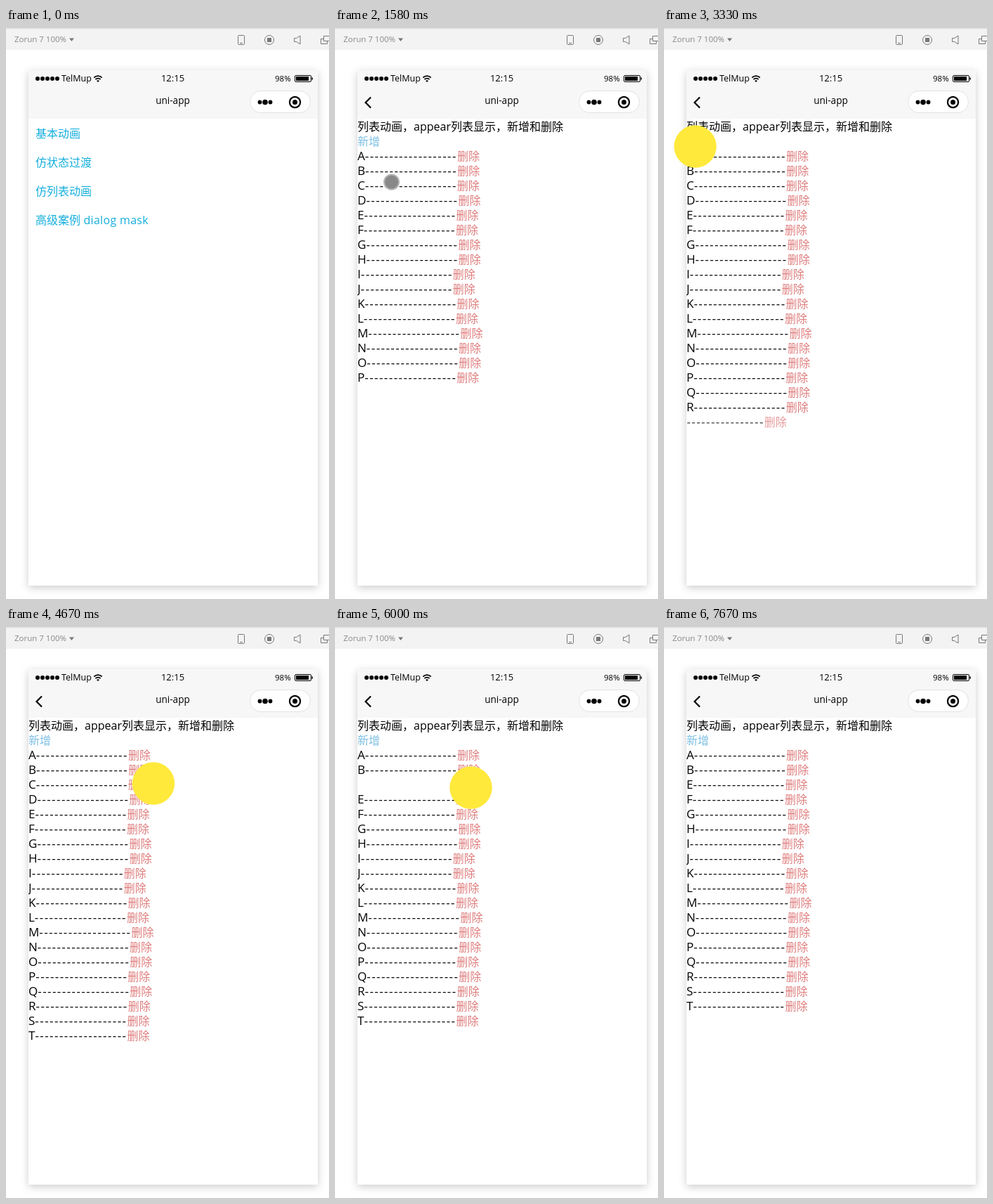
These frames come from a looping animation (460x812 px, 7.76 s). An HTML page:

```html
<!DOCTYPE html>
<html lang="zh-CN">
<head>
<meta charset="utf-8">
<title>List animation</title>
<style>
  html, body { margin: 0; width: 100%; height: 100%; overflow: hidden; background: #fff; }
  svg { display: block; font-family: "Open Sans", "Noto Sans CJK SC", "Noto Sans CJK", sans-serif; font-size: 16px; }
  .phone { filter: drop-shadow(0 3px 6px rgba(0, 0, 0, .2)); }
  .tool { fill: none; stroke: #777; }
  .link { fill: #14aedd; }
  .add { fill: #7dbfe3; }
  .row { font-size: 17px; }
  .dash { letter-spacing: 1.43px; }
  .del { fill: #df7c7c; font-size: 16px; }
  .mid { text-anchor: middle; }
</style>
</head>
<body>
<svg width="460" height="812" viewBox="0 0 460 812">
  <defs><clipPath id="screen"><rect x="32" y="129" width="412" height="664"/></clipPath></defs>

  <!-- toolbar -->
  <rect width="460" height="31" fill="#f3f3f3"/>
  <rect width="460" height="1.5" fill="#e2e2e2"/>
  <text x="12" y="20" font-size="11.5" fill="#888">Zorun 7 100%</text>
  <path d="M90 14.5h7l-3.5 4.5z" fill="#777"/>
  <g class="tool">
    <rect x="330.5" y="10.5" width="9" height="13" rx="1"/>
    <path d="M333 21.5h4"/>
    <circle cx="375" cy="17" r="6.5"/>
    <rect x="372.5" y="14.5" width="5" height="5" fill="#777"/>
    <path d="M410.5 14.5h3l5.500-3.500v12l-5.500-3.500h-3z"/>
    <path d="M452.500 18.500v-7h9M448.500 15.500h4M448.500 15.500v7h9v-4M452.500 18.500h9"/>
  </g>

  <!-- phone -->
  <rect class="phone" x="32" y="60" width="412" height="733" fill="#fff"/>
  <rect x="32" y="60" width="412" height="69" fill="#f7f7f7"/>
  <path d="M45 72h28.100" stroke="#000" stroke-width="6" stroke-linecap="round" stroke-dasharray="0 7"/>
  <text x="79" y="76" font-size="12.500">TelMup</text>
  <g fill="none" stroke="#000" stroke-width="1.700">
    <path d="M125.300 70.500q5.700-4.600 11.400 0M127.400 73q3.600-2.900 7.200 0"/>
  </g>
  <path d="M129 75q2-1.600 4 0l-2 2z"/>
  <text class="mid" x="237.500" y="76" font-size="13">12:15</text>
  <text x="383" y="76" font-size="11.500">98%</text>
  <rect x="411.500" y="67.500" width="23" height="9" rx="1.500" fill="none" stroke="#000"/>
  <rect x="413" y="69" width="18" height="6"/>
  <rect x="435.500" y="70.500" width="1.500" height="3"/>
  <text class="mid" x="237.500" y="108" font-size="13.600">uni-app</text>
  <rect x="347.500" y="89.500" width="86" height="31" rx="15.500" fill="#fff" stroke="#e3e3e3"/>
  <circle cx="361.500" cy="105.500" r="2.900"/>
  <circle cx="369" cy="105.500" r="3.800"/>
  <circle cx="376.500" cy="105.500" r="2.900"/>
  <circle cx="411.500" cy="105.500" r="7.600" fill="none" stroke="#000" stroke-width="2.200"/>
  <circle cx="411.500" cy="105.500" r="3.500"/>

  <g id="home" class="link">
    <text x="42" y="156">基本动画</text>
    <text x="42" y="197">仿状态过渡</text>
    <text x="42" y="238">仿列表动画</text>
    <text x="42" y="279">高级案例<tspan letter-spacing=".3"> dialog mask</tspan></text>
  </g>

  <g id="list">
    <path d="M51 98.500l-7.500 7.500 7.500 7.500" fill="none" stroke="#000" stroke-width="2.200"/>
    <text x="32" y="146">列表动画，appear列表显示，新增和删除</text>
    <text class="add" x="32" y="167">新增</text>
    <g id="rows" clip-path="url(#screen)"></g>
  </g>

  <g id="pointer">
    <circle id="halo" r="30.200" fill="#ffe93b"/>
    <circle id="touch" r="10.500" fill="#898989" stroke="#b4b4b4" stroke-width="2"/>
  </g>
</svg>
<script>
  const LOOP = 7760, STEP = 250 / 3, MOVE = 380, ROW = 21;
  const OPEN = 1000, TOUCH = [850, 1700];
  const addedAt = { Q: 2560, R: 2850, S: 3170, T: 3500 };
  const removedAt = { C: 5100, D: 5700 };
  // pointer stops: time, x, y
  const path = [
    [250, 150, 850], [800, 80.5, 219], [1700, 80.5, 219], [2330, 37, 166],
    [2750, 37.5, 166.5], [3330, 44.5, 168.5], [4100, 45, 169], [4670, 210, 222.5],
    [5000, 195, 226], [6000, 193.5, 228.5], [6350, 193.5, 229], [6900, 150, 850]
  ];

  const $ = id => document.getElementById(id);
  const clamp = v => Math.min(1, Math.max(0, v));
  const easeOut = p => 1 - (1 - p) ** 3;
  const smooth = p => p * p * (3 - 2 * p);
  const show = (el, on) => el.setAttribute("visibility", on ? "inherit" : "hidden");

  const rows = [..."ABCDEFGHIJKLMNOPQRST"].map(letter => {
    const el = document.createElementNS("http://www.w3.org/2000/svg", "text");
    el.setAttribute("class", "row");
    el.innerHTML = `${letter}<tspan class="dash">${"-".repeat(19)}</tspan><tspan class="del">删除</tspan>`;
    $("rows").append(el);
    return { el, start: addedAt[letter] ?? -MOVE, end: removedAt[letter] ?? Infinity };
  });

  function pointerAt(t) {
    const i = path.findIndex(stop => stop[0] > t);
    if (i < 0) return path[path.length - 1].slice(1);
    if (i === 0) return path[0].slice(1);
    const a = path[i - 1], b = path[i];
    const p = smooth((t - a[0]) / (b[0] - a[0]));
    return [a[1] + (b[1] - a[1]) * p, a[2] + (b[2] - a[2]) * p];
  }

  function drawRows(t) {
    let slot = 0;
    for (const { el, start, end } of rows) {
      const present = t >= start && t < end + MOVE;
      show(el, present);
      if (!present) continue;
      const enter = clamp((t - start) / MOVE), leave = clamp((t - end) / MOVE);
      const x = 32 - 160 * (1 - easeOut(enter)) - 200 * easeOut(leave);
      el.setAttribute("transform", `translate(${x} ${188 + ROW * slot++})`);
      el.setAttribute("opacity", clamp(enter * 1.8) * (1 - leave));
    }
  }

  function draw(now) {
    const t = Math.floor((now % LOOP + 5) / STEP) * STEP;
    const opened = t >= OPEN, touching = t >= TOUCH[0] && t < TOUCH[1];
    show($("home"), !opened);
    show($("list"), opened);
    drawRows(t);
    $("pointer").setAttribute("transform", `translate(${pointerAt(t)})`);
    show($("touch"), touching);
    show($("halo"), !touching);
  }

  const t0 = performance.now();
  function tick() {
    draw(performance.now() - t0);
    requestAnimationFrame(tick);
  }
  tick();
</script>
</body>
</html>
```
